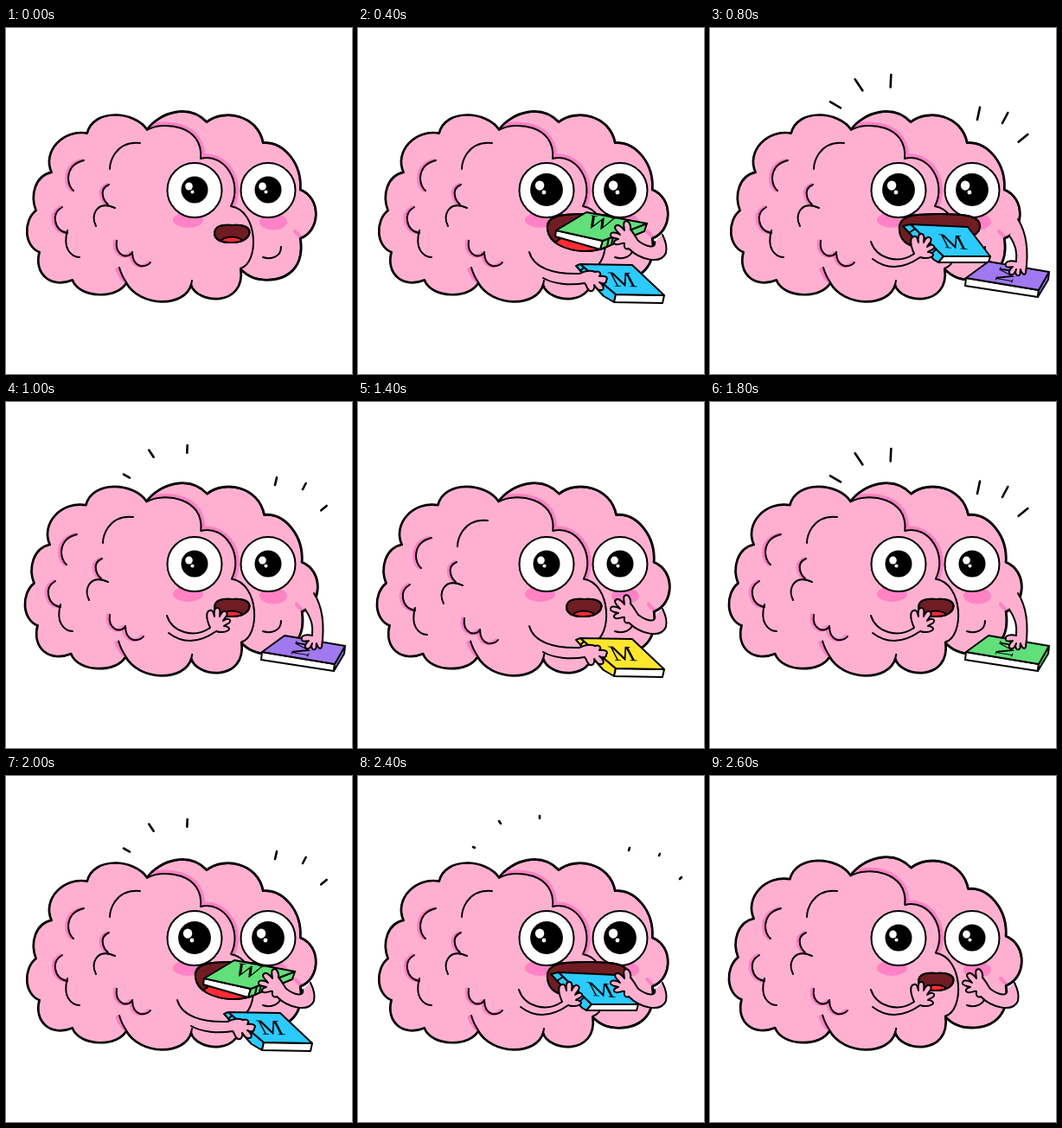
Recreate the animation shown at these times as an HTML page. Size 400 px wide and 400 px high, loop 2.8 s.

```html
<!DOCTYPE html>
<html lang="en">
<head>
<meta charset="utf-8">
<title>Hungry brain</title>
<style>
  html, body { margin: 0; width: 100%; height: 100%; overflow: hidden; background: #fff; }
  svg { display: block; width: 100vw; height: 100vh; }
  .ink { stroke: #000; stroke-width: 2; stroke-linecap: round; stroke-linejoin: round; fill: none; }
  .skin { fill: #ffb0d0; }
  .rim { stroke: #000; stroke-width: 3.4; stroke-linejoin: round; }
  .shade { stroke: #ff80c4; stroke-width: 9; fill: none; stroke-linecap: round; }
  text { font-family: "Liberation Serif", "Noto Serif", serif; font-size: 31px; text-anchor: middle; }
</style>
</head>
<body>
<svg id="stage" viewBox="0 0 400 400"></svg>
<script>
const STEP = 200;
const GREEN = '#61df79', BLUE = '#2bcaff', PURPLE = '#a078f0', YELLOW = '#ffe62e';

const path = (d, cls = 'ink', extra = '') => `<path class="${cls}" d="${d}" ${extra}/>`;
const poly = (pts, fill) => `<polygon class="ink" points="${pts}" style="fill:${fill}"/>`;
const oval = (x, y, rx, ry, attrs) => `<ellipse cx="${x}" cy="${y}" rx="${rx}" ry="${ry}" ${attrs}/>`;
const letter = (ch, matrix) => `<text transform="matrix(${matrix})">${ch}</text>`;

const BACK = 'M163 118 C177 98 211 87 232 109 C253 93 291 101 297 133 C321 131 342 157 340 187 ' +
  'C365 197 363 235 340 243 C345 275 327 291 301 291 C288 291 278 286 271 278 L200 240Z';
const EDGE_TOP = 'M163 118 C181 107 229 112 225 151';
const EDGE_MID = 'M225 151 C253 144 274 179 260 206';
const FRONT = 'M163 118 C149 96 101 93 94 122 C66 117 42 143 53 167 C34 171 28 193 35 211 ' +
  'C20 223 21 252 39 259 C32 285 53 301 77 291 C85 313 130 313 139 294 ' +
  'C155 323 207 323 214 296 C220 319 277 323 271 278 C293 272 292 211 260 206 ' +
  'C274 179 253 144 225 151 C229 112 181 107 163 118Z';
const FOLDS = [
  'M90 153 Q73 157 72 173 Q72 183 78 188',
  'M119 181 Q110 185 112 194 Q113 200 118 204',
  'M65 207 Q55 213 57 223 Q59 235 71 237',
  'M128 246 Q126 258 135 263 Q143 265 146 259 Q146 272 155 275 Q163 276 167 271'
];
const PLAIN_FOLDS = [
  'M155 133 Q136 131 126 145 Q120 154 120 163',
  'M126 208 Q111 201 104 211 Q99 219 104 229',
  'M71 234 Q67 249 72 257 Q77 265 85 265'
];

function brain(puff) {
  const grow = puff ? 'transform="translate(200 312) scale(1.013) translate(-200 -312)"' : '';
  const drift = puff ? `transform="translate(${puff})"` : '';
  return `<g ${grow}>` + path(BACK, 'rim') + path(FRONT, 'rim') + path(BACK, 'ink skin', 'style="fill:#ffb0d0"') +
    '<g clip-path="url(#back)">' + path(EDGE_TOP, 'shade') + path(EDGE_MID, 'shade') +
    path('M334 235 L341 242', 'shade', 'style="stroke-width:4"') + '</g>' +
    path(BACK) + path(FRONT, 'ink', 'style="fill:#ffb0d0"') +
    path('M129 279 Q132 287 137 292', 'shade', 'style="stroke-width:5"') +
    path('M131 277 Q134 287 139 294 M215 292 L214 297') + '</g>' +
    path('M297 265 C306 268 318 265 318 253') +
    `<g ${drift}>` +
    FOLDS.map(d => path(d, 'shade', 'style="stroke-width:4" transform="translate(-2 0)"')).join('') +
    FOLDS.concat(PLAIN_FOLDS).map(d => path(d)).join('') + '</g>';
}

function eye(x, pupil) {
  return oval(x, 187.5, 31.5, 31.5, 'class="ink" style="fill:#fff"') +
    `<g transform="translate(${x} 187) scale(${pupil})">` + oval(0, 0, 15.5, 15.5, '') +
    oval(-6.5, -4, 4.3, 4.6, 'fill="#fff"') + oval(-2.5, 2.5, 2, 2, 'fill="#fff"') + '</g>';
}

function face(pupil) {
  return oval(210.5, 222, 17.5, 9, 'fill="#ff82c5"') + oval(309, 224, 16, 9.5, 'fill="#ff82c5"') +
    eye(218, pupil) + eye(303, pupil);
}

const MOUTHS = {
  small: ['M241 238 C241 228 251 227 262 228 C274 227 284 230 281 239 C277 247 268 248 260 248 C250 248 242 245 241 238Z',
    oval(261, 248, 13, 6.5, 'class="ink" style="fill:#ff2b35"')],
  right: ['M219 233 C217 217 233 215 261 215 C296 215 305 220 305 232 C302 250 282 258 262 258 C238 257 221 248 219 233Z',
    oval(262, 254, 36, 17, 'class="ink" style="fill:#ff2b35"')],
  left: ['M219 234 C217 216 236 215 265 215 C302 215 312 219 312 229 C312 240 300 241 290 243 L245 255 C228 252 220 246 219 234Z', '']
};
function mouth(kind) {
  const [d, tongue] = MOUTHS[kind];
  return path(d, 'ink', 'style="fill:#701c23"') +
    `<clipPath id="lips"><path d="${d}"/></clipPath><g clip-path="url(#lips)">${tongue}</g>` + path(d);
}

const BOOKS = {
  lowLeft: c => poly('252,275 257,273 298,308 296,317 284,310', c) +
    poly('298,308 354,309 352,318 296,317', '#fff') +
    poly('257,273 317,274 354,309 298,308', c) + path('M257 281 L261 277 M279 302 L284 297') +
    letter('M', '1 .02 .42 .8 310 299'),
  lowRight: c => poly('296,289 380,303 379,311 295,298', '#fff') +
    poly('380,303 392,282 391,291 379,311', c) +
    poly('296,289 322,270 392,282 380,303', c) +
    letter('M', '.24 -.6 .96 .16 352 287'),
  eatRight: c => poly('229,234 283,246 280,256 228,241', '#fff') +
    poly('283,246 334,226 331,235 280,256', c) +
    poly('229,234 264,213 334,226 283,246', c) + path('M290 243 L288 252 M295 241 L293 250') +
    letter('W', '1 .12 -.45 .68 275 232'),
  eatLeft: c => poly('223,229 232,227 270,264 264,271 259,268', c) +
    poly('270,264 324,264 322,271 264,271', '#fff') +
    poly('232,227 298,230 324,264 270,264', c) + path('M230 237 L237 232 M254 263 L261 256') +
    letter('M', '1 .08 .4 .78 285 255')
};

// Each arm: inner edge, then the hand and the way back to the body.
const ARMS = {
  leftLow: ['M198 259 C203 277 225 285 256 284',
    'C262 281 268 279 274 282 C279 280 282 284 279 287 C285 286 290 288 287 292 C287 296 283 296 279 294 ' +
    'C285 298 285 303 281 303 C277 304 275 299 273 297 C274 301 272 305 268 304 C264 302 265 298 262 295 C245 298 226 296 214 289'],
  leftUp: ['M186 247 C192 266 217 274 236 261',
    'C232 252 230 242 236 241 C239 240 240 244 241 248 C240 242 241 237 245 238 C249 239 247 246 247 248 ' +
    'C249 243 252 240 255 243 C258 246 252 250 251 253 C255 250 260 250 259 254 C258 257 253 257 252 259 ' +
    'C256 259 260 262 257 264 C252 267 246 266 243 265 C223 279 205 280 188 267'],
  rightUp: ['M343 247 C345 256 333 253 324 246',
    'C320 240 318 236 315 233 C316 227 312 221 308 224 C306 227 308 231 308 234 C304 228 299 226 297 230 ' +
    'C297 234 301 236 303 239 C297 235 291 236 292 240 C293 243 299 243 301 244 C296 245 294 249 298 250 ' +
    'C303 251 305 248 308 249 C307 253 309 257 313 255 C326 268 350 274 356 260 C358 252 355 245 352 239'],
  rightLow: ['M346 240 C354 252 355 260 354 270',
    'C347 268 340 270 342 275 C343 278 349 276 350 276 C346 279 344 284 348 285 C351 286 353 282 354 279 ' +
    'C352 283 354 287 357 286 C360 285 358 280 359 279 C360 284 364 287 365 283 C368 262 368 240 356 221']
};
const arm = name => path(ARMS[name].join(' '), 'ink', 'style="fill:#ffb0d0"');

// Inner and outer ends of each dash, at the start and at the end of the burst.
const DASHES = [
  [159, 97, 142, 87, 135, 83, 133, 82],
  [182, 81, 170, 63, 165, 55, 163, 52],
  [208, 78, 209, 58, 210, 49, 210, 46],
  [307, 116, 311, 96, 313, 86, 314, 83],
  [333, 119, 342, 102, 348, 92, 349, 90],
  [349, 138, 364, 126, 372, 119, 374, 117]
];
function burst(k) {
  const d = DASHES.map(p => {
    const [x1, y1, x2, y2] = p.slice(0, 4).map((v, i) => v + (p[i + 4] - v) * k / 3);
    return `M${x1} ${y1} L${x2} ${y2}`;
  }).join('');
  return path(d, 'ink', 'style="stroke-width:2.6"');
}

const A = '-5 4', B = '-8 0';
// puff, mouth, left arm, right arm, books, burst stage
const STEPS = [
  [0, 'small', '', '', {}],
  [0, 'small', 'leftLow', 'rightLow', { lowRight: GREEN }],
  [0, 'right', 'leftLow', 'rightUp', { eatRight: GREEN, lowLeft: BLUE }],
  [A, 'small', 'leftLow', 'rightUp', { lowLeft: BLUE }, 0],
  [0, 'left', 'leftUp', 'rightLow', { eatLeft: BLUE, lowRight: PURPLE }, 1],
  [B, 'small', 'leftUp', 'rightLow', { lowRight: PURPLE }, 2],
  [0, 'right', 'leftLow', 'rightUp', { eatRight: PURPLE, lowLeft: YELLOW }, 3],
  [A, 'small', 'leftLow', 'rightUp', { lowLeft: YELLOW }],
  [0, 'left', 'leftUp', 'rightLow', { eatLeft: YELLOW, lowRight: GREEN }, 0],
  [B, 'small', 'leftUp', 'rightLow', { lowRight: GREEN }, 1],
  [0, 'right', 'leftLow', 'rightUp', { eatRight: GREEN, lowLeft: BLUE }, 2],
  [A, 'small', 'leftLow', 'rightUp', { lowLeft: BLUE }, 3],
  [0, 'left', 'leftUp', 'rightUp', { eatLeft: BLUE }, 3],
  [B, 'small', 'leftUp', 'rightUp', {}]
];

function scene([puff, lips, left, right, books, stage]) {
  const pupil = lips === 'small' ? 1 : 1.22;
  return `<clipPath id="back"><path d="${BACK}"/></clipPath>` + brain(puff) + face(pupil) + mouth(lips) +
    Object.entries(books).map(([place, color]) => BOOKS[place](color)).join('') +
    [left, right].filter(Boolean).map(arm).join('') +
    (stage === undefined ? '' : burst(stage));
}

const svg = document.getElementById('stage');
const scenes = STEPS.map(scene);
const start = performance.now();
let shown = -1;
function draw() {
  const i = Math.floor(Math.max(0, performance.now() - start) / STEP) % scenes.length;
  if (i !== shown) svg.innerHTML = scenes[shown = i];
  requestAnimationFrame(draw);
}
draw();
</script>
</body>
</html>
```
